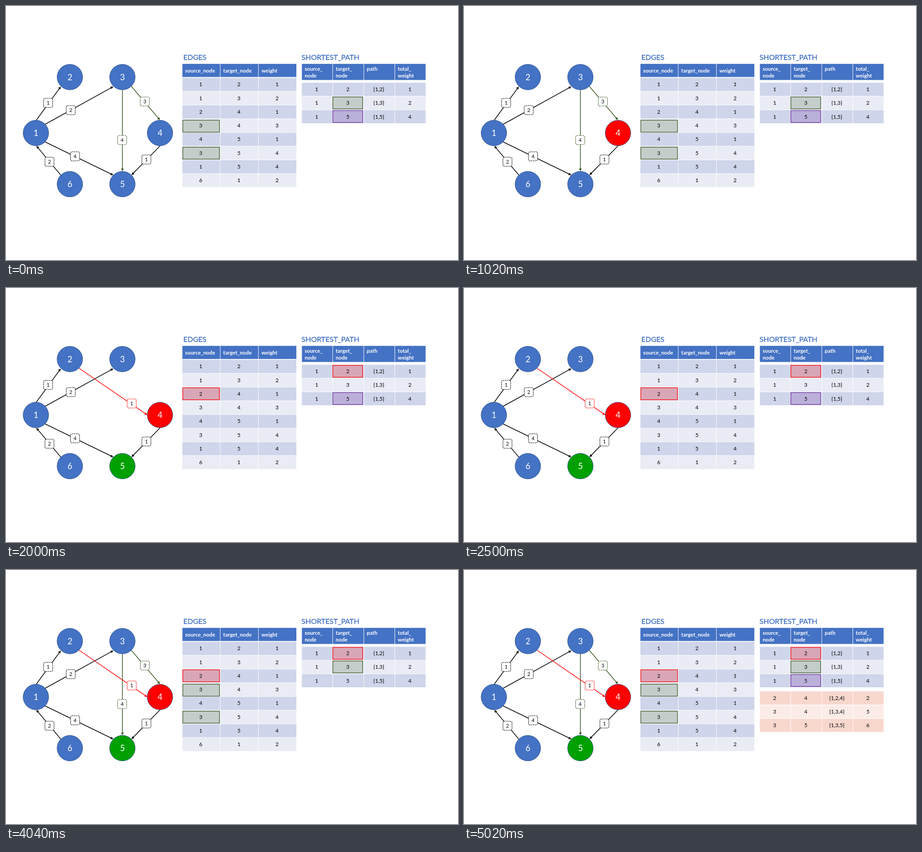
Animation, 998 px wide and 561 px high, one loop 7.08 s. Source, as an HTML page with a canvas:

```html
<!DOCTYPE html>
<html lang="en">
<head>
<meta charset="utf-8">
<title>Shortest path</title>
<style>
html, body { margin: 0; width: 100%; height: 100%; overflow: hidden; background: #fff; }
canvas { display: block; }
</style>
</head>
<body>
<canvas id="stage" width="998" height="561"></canvas>
<script>
const ctx = document.getElementById('stage').getContext('2d');
const LOOP = 7080;
const FONT = 'Lato, "Open Sans", sans-serif';
const BLUE = [68, 114, 196], RED = [255, 0, 0], GREEN = [0, 160, 0];
const DARK_GREEN = '#375623';
const BANDS = ['#cfd5ea', '#e9ebf5'];
const ORANGE_BANDS = ['#f8d7cd', '#fcece8'];

const nodes = { 1: [66, 280.5], 2: [141, 157], 3: [257, 157], 4: [340, 280.5], 5: [257, 393.5], 6: [141, 393.5] };

// from, to, label position, weight
const edges = [
  [67, 252, 121, 178, 93, 214, 1],
  [86, 261.5, 237, 178, 143, 230, 2],
  [86, 300, 237, 373.5, 152.5, 332, 4],
  [121, 373.5, 67, 309, 96, 344, 2],
  [340, 309, 277, 373.5, 310, 339, 1]
];
const greenEdges = [
  [276.5, 177, 340, 252, 306.5, 211, 3],
  [257, 186, 257, 365, 256.5, 296, 4]
];
const redEdge = [161, 177, 312, 280.5, 277.5, 255, 1];

const edgeRows = ['1 2 1', '1 3 2', '2 4 1', '3 4 3', '4 5 1', '3 5 4', '1 5 4', '6 1 2'];
const pathRows = ['1 2 {1,2} 1', '1 3 {1,3} 2', '1 5 {1,5} 4'];
const newRows = ['2 4 {1,2,4} 2', '3 4 {1,3,4} 5', '3 5 {1,3,5} 6'];
const edgeCols = [389, 473, 557.3, 641.6];
const pathCols = [652.8, 721.3, 790, 858.5, 927];

const mix = (a, b, p) => `rgb(${a.map((v, i) => Math.round(v + (b[i] - v) * p))})`;
const steps = (t, start, gap, n) =>
  Math.max(0, Math.min(n, Math.floor((t - start) / gap) + 1)) / n;
// Visibility flips at each given time
const flips = (t, first, times) => times.filter(x => t >= x).length % 2 ? !first : first;

function text(s, x, y, size, color = '#000', align = 'center', weight = 400) {
  ctx.font = `${weight} ${size}px ${FONT}`;
  ctx.textAlign = align;
  ctx.fillStyle = color;
  ctx.fillText(s, x, y + size * 0.36);
}

function drawTitle(s, x) {
  text(s, x, 113, 16, '#4472c4', 'left');
  ctx.strokeStyle = '#4472c4';
  ctx.lineWidth = 0.35;
  ctx.strokeText(s, x, 113 + 16 * 0.36);
}

function drawEdge([x1, y1, x2, y2, lx, ly, weight], color) {
  const a = Math.atan2(y2 - y1, x2 - x1), c = Math.cos(a), s = Math.sin(a);
  ctx.strokeStyle = ctx.fillStyle = color;
  ctx.lineWidth = 1.5;
  ctx.beginPath();
  ctx.moveTo(x1, y1);
  ctx.lineTo(x2 - 4 * c, y2 - 4 * s);
  ctx.stroke();
  ctx.beginPath();
  ctx.moveTo(x2, y2);
  ctx.lineTo(x2 - 6 * c - 3 * s, y2 - 6 * s + 3 * c);
  ctx.lineTo(x2 - 6 * c + 3 * s, y2 - 6 * s - 3 * c);
  ctx.fill();

  ctx.beginPath();
  ctx.roundRect(lx - 10, ly - 10, 20, 20, 3.3);
  ctx.fillStyle = '#fff';
  ctx.fill();
  ctx.lineWidth = 1.1;
  ctx.setLineDash([3, 1.1]);
  ctx.stroke();
  ctx.setLineDash([]);
  text(weight, lx, ly, 11.2);
}

function drawNode(id, fill) {
  const [x, y] = nodes[id];
  ctx.beginPath();
  ctx.arc(x, y, 28.2, 0, Math.PI * 2);
  ctx.fillStyle = fill;
  ctx.fill();
  ctx.strokeStyle = '#2f528f';
  ctx.lineWidth = 1;
  ctx.stroke();
  text(id, x, y, 18.5, '#fff');
}

function band(cols, y, h, color) {
  ctx.fillStyle = color;
  for (let i = 0; i < cols.length - 1; i++)
    ctx.fillRect(cols[i] + 0.5, y, cols[i + 1] - cols[i] - 1, h);
}

function drawHeader(cols, h, labels, mid) {
  band(cols, 127.8, h, '#4472c4');
  labels.forEach((label, i) => label.split(' ').forEach((line, j) =>
    text(line, cols[i] + 6.6, mid + j * 14.8, 11.7, '#fff', 'left', 700)));
}

function drawBands(cols, y, h, count, colors) {
  for (let i = 0; i < count; i++) band(cols, y + i * h + 0.5, h - 1, colors[i % 2]);
}

function drawValues(cols, y, h, rows) {
  rows.forEach((row, i) => row.split(' ').forEach((value, j) =>
    text(value, (cols[j] + cols[j + 1]) / 2 - 1, y + (i + 0.5) * h - 0.3, 12)));
}

function mark(x, y, w, fill, stroke) {
  ctx.fillStyle = fill;
  ctx.strokeStyle = stroke;
  ctx.lineWidth = 1.3;
  ctx.fillRect(x, y, w, 26.4);
  ctx.strokeRect(x, y, w, 26.4);
}
const markEdge = (y, ...colors) => mark(390.4, y, 81, ...colors);
const markPath = (y, ...colors) => mark(721.7, y, 65.8, ...colors);

function draw(t) {
  const redOn = flips(t, false, [280, 520, 770, 1020, 1270]);
  const greenOn = flips(t, true, [1520, 1760, 2000, 2250, 2500, 2790]);
  const purpleOn = flips(t, true, [3040, 3290, 3540, 3790, 4040, 4290]);
  const redFill = ['#d9a6b7', '#f00'];
  const greenFill = ['#c5cdca', DARK_GREEN];

  ctx.fillStyle = '#fff';
  ctx.fillRect(0, 0, 998, 561);

  edges.forEach(e => drawEdge(e, '#000'));
  if (greenOn) greenEdges.forEach(e => drawEdge(e, DARK_GREEN));
  if (redOn) drawEdge(redEdge, '#f00');
  const fills = {
    4: mix(BLUE, RED, steps(t, 40, 48, 11)),
    5: mix(BLUE, GREEN, steps(t, 1520, 48, 11))
  };
  for (const id in nodes) drawNode(id, fills[id] || '#4472c4');

  drawTitle('EDGES', 391.5);
  drawTitle('SHORTEST_PATH', 652.5);
  drawHeader(edgeCols, 29, ['source_node', 'target_node', 'weight'], 142.3);
  drawHeader(pathCols, 35.6, ['source_ node', 'target_ node', 'path', 'total_ weight'], 139);
  drawBands(edgeCols, 158.2, 30.28, 8, BANDS);
  drawBands(pathCols, 169, 30.2, 3, BANDS);

  if (redOn) {
    markEdge(220.4, ...redFill);
    markPath(170.8, ...redFill);
  }
  if (greenOn) {
    markEdge(252.2, ...greenFill);
    markEdge(311.8, ...greenFill);
    markPath(200.9, ...greenFill);
  }
  if (purpleOn) markPath(230.9, '#bbb0d9', '#7030a0');

  drawValues(edgeCols, 158.2, 30.28, edgeRows);
  drawValues(pathCols, 169, 30.2, pathRows);

  ctx.globalAlpha = steps(t, 4580, 40, 12);
  drawBands(pathCols, 267.6, 30.2, 3, ORANGE_BANDS);
  drawValues(pathCols, 267.6, 30.2, newRows);
  ctx.globalAlpha = 1;
}

const start = performance.now();
function tick() {
  draw((performance.now() - start) % LOOP);
  requestAnimationFrame(tick);
}
tick();
</script>
</body>
</html>
```
